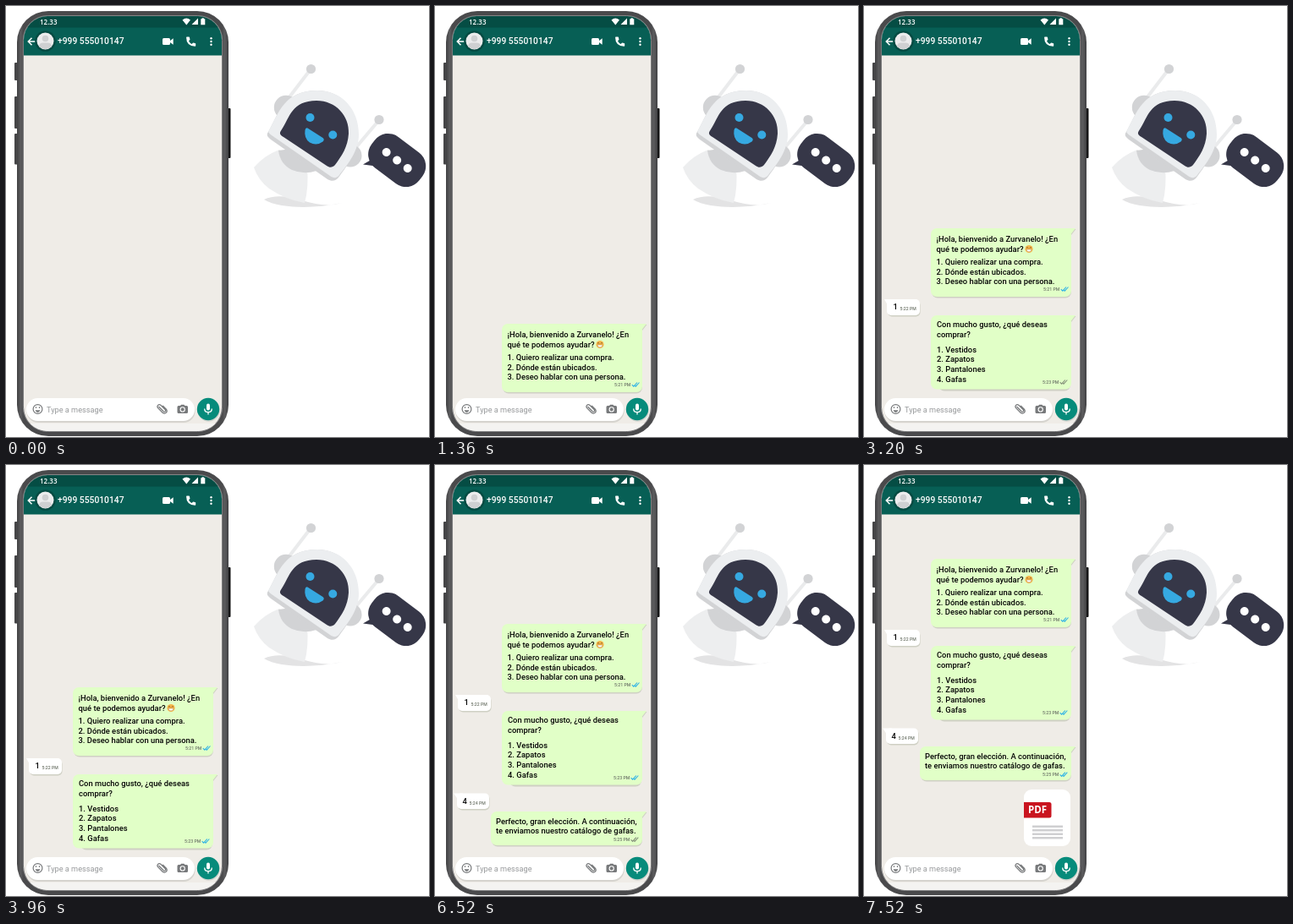
These frames come from a looping animation (500 px wide and 510 px high, 9200 ms). An HTML page:

```html
<!DOCTYPE html>
<html lang="es">
<head>
<meta charset="utf-8">
<title>Chatbot</title>
<style>
  html, body { margin: 0; width: 100%; height: 100%; overflow: hidden; background: #fff; }
  svg { display: block; }
  text { font-family: Roboto, Arial, sans-serif; }

  .chat text { font-size: 9.4px; font-weight: 500; fill: #050505; }
  .chat .time { font-size: 5.2px; fill: #6f766a; }
  .chat .pdf { font: 700 11.5px "Open Sans", sans-serif; fill: #fff; }
  .out { fill: #e1ffc7; }
  .in { fill: #fff; }
  .shade { fill: #cfd0c4; }
  .tick { fill: none; stroke: #85917b; stroke-width: 1.1; }

  /* Every change is a hard cut on one shared loop. */
  .chat, .msg, .tick { animation: 9.2s step-end infinite; }
  .chat { animation-name: scroll; }
  .m1 { animation-name: m1; }
  .m2 { animation-name: m2; }
  .m3 { animation-name: m3; }
  .m4 { animation-name: m4; }
  .m5 { animation-name: m5; }
  .m6 { animation-name: m6; }
  .t1 { animation-name: t1; }
  .t3 { animation-name: t3; }
  .t5 { animation-name: t5; }

  @keyframes scroll {
    0% { transform: translateY(0); }
    20% { transform: translateY(-29px); }
    34.7826% { transform: translateY(-113px); }
    52.1739% { transform: translateY(-142px); }
    70.8695% { transform: translateY(-188px); }
    81.7391%, to { transform: translateY(-265px); }
  }
  @keyframes m1 { 0% { opacity: 0; } 1.7391%, to { opacity: 1; } }
  @keyframes m2 { 0% { opacity: 0; } 20%, to { opacity: 1; } }
  @keyframes m3 { 0% { opacity: 0; } 34.7826%, to { opacity: 1; } }
  @keyframes m4 { 0% { opacity: 0; } 52.1739%, to { opacity: 1; } }
  @keyframes m5 { 0% { opacity: 0; } 70.8695%, to { opacity: 1; } }
  @keyframes m6 { 0% { opacity: 0; } 81.7391%, to { opacity: 1; } }
  @keyframes t1 { 0% { stroke: #85917b; } 14.7826%, to { stroke: #2fb2e6; } }
  @keyframes t3 { 0% { stroke: #85917b; } 43.0434%, to { stroke: #2fb2e6; } }
  @keyframes t5 { 0% { stroke: #85917b; } 78.6956%, to { stroke: #2fb2e6; } }
</style>
</head>
<body>
<svg width="500" height="510" viewBox="0 0 500 510">
  <defs>
    <linearGradient id="metal">
      <stop offset="0" stop-color="#414143"/>
      <stop offset=".018" stop-color="#5c5c5e"/>
      <stop offset=".03" stop-color="#4a4a4c"/>
      <stop offset=".97" stop-color="#4a4a4c"/>
      <stop offset=".982" stop-color="#5c5c5e"/>
      <stop offset="1" stop-color="#414143"/>
    </linearGradient>
    <clipPath id="screen"><rect x="21" y="12" width="234" height="491" rx="28"/></clipPath>
    <path id="check" d="M.3 3.2l2 2L6.5.5M3.9 4.5l.8.7L9 .5"/>
  </defs>

  <!-- Phone body -->
  <g fill="#454547">
    <rect x="10" y="67" width="5" height="21" rx="1"/>
    <rect x="10" y="107" width="5" height="38" rx="1"/>
    <rect x="10" y="151" width="5" height="36.500" rx="1"/>
  </g>
  <rect x="261" y="121" width="4.500" height="59" rx="1" fill="#161617"/>
  <rect x="13" y="6" width="250" height="503" rx="37" fill="url(#metal)"/>
  <rect x="20.300" y="11.500" width="235.400" height="492" rx="29" fill="none" stroke="#858587"/>

  <g clip-path="url(#screen)">
    <rect x="21" y="12" width="234" height="491" fill="#efece7"/>

    <!-- Conversation -->
    <g class="chat">
      <g class="msg m1">
        <rect class="shade" x="80" y="378" width="165" height="80.500" rx="7"/>
        <path class="shade" d="M240 377H250.500L245 384Z"/>
        <rect class="out" x="79" y="376" width="166" height="81" rx="7"/>
        <path class="out" d="M236 376H250L244.500 383Z"/>
        <text x="85.500" y="392">¡Hola, bienvenido a Zurvanelo! ¿En</text>
        <text x="85.500" y="403.500">qué te podemos ayudar?</text>
        <circle cx="195" cy="400.500" r="4.600" fill="#f5b84c"/>
        <path d="M191.800 401H198.200Q197.800 403.900 195 403.900T191.800 401Z" fill="#fff" stroke="#b57832" stroke-width=".5"/>
        <path d="M192 399.300q1.200-1.600 2.300 0M195.700 399.300q1.200-1.600 2.300 0" fill="none" stroke="#7b4b1f" stroke-width=".8"/>
        <text x="85.500" y="419">1. Quiero realizar una compra.</text>
        <text x="85.500" y="430.500">2. Dónde están ubicados.</text>
        <text x="85.500" y="442">3. Deseo hablar con una persona.</text>
        <text class="time" x="212" y="450">5:21 PM</text>
        <use class="tick t1" href="#check" x="232.500" y="445"/>
      </g>

      <g class="msg m2">
        <rect class="shade" x="28" y="462" width="38.500" height="18.500" rx="5"/>
        <rect class="in" x="27" y="460" width="39" height="19" rx="5"/>
        <path class="in" d="M24 460H34L28 467Z"/>
        <text x="34.500" y="472">1</text>
        <text class="time" x="42.500" y="473">5:22 PM</text>
      </g>

      <g class="msg m3">
        <rect class="shade" x="88" y="481" width="156" height="87.500" rx="7"/>
        <path class="shade" d="M240 480H250.500L245 487Z"/>
        <rect class="out" x="79" y="479" width="166" height="87.500" rx="7"/>
        <path class="out" d="M236 479H250L244.500 486Z"/>
        <text x="86" y="493">Con mucho gusto, ¿qué deseas</text>
        <text x="86" y="504.500">comprar?</text>
        <text x="86" y="522.500">1. Vestidos</text>
        <text x="86" y="534">2. Zapatos</text>
        <text x="86" y="546">3. Pantalones</text>
        <text x="86" y="557.500">4. Gafas</text>
        <text class="time" x="211" y="560">5:23 PM</text>
        <use class="tick t3" href="#check" x="231.300" y="555"/>
      </g>

      <g class="msg m4">
        <rect class="shade" x="27" y="578" width="37.500" height="18.500" rx="5"/>
        <rect class="in" x="26" y="576.500" width="38" height="18.500" rx="5"/>
        <path class="in" d="M22 576.500H33L27 583.500Z"/>
        <text x="32.500" y="588.500">4</text>
        <text class="time" x="40.500" y="589.800">5:24 PM</text>
      </g>

      <g class="msg m5">
        <rect class="shade" x="67" y="600" width="178" height="39.500" rx="7"/>
        <path class="shade" d="M240 599H250.500L245 606Z"/>
        <rect class="out" x="66" y="598" width="179" height="40" rx="7"/>
        <path class="out" d="M236 598H250L244.500 605Z"/>
        <text x="72" y="612.500">Perfecto, gran elección. A continuación,</text>
        <text x="72" y="624">te enviamos nuestro catálogo de gafas.</text>
        <text class="time" x="211" y="633">5:25 PM</text>
        <use class="tick t5" href="#check" x="231.300" y="628.200"/>
      </g>

      <g class="msg m6">
        <rect class="in" x="189" y="649" width="55" height="67" rx="9"/>
        <path d="M189 664H219Q221.500 664 221.500 666.500V680Q221.500 682.500 219 682.500H189Z" fill="#c9141f"/>
        <text class="pdf" x="205" y="677.300" text-anchor="middle">PDF</text>
        <path d="M199 692.800H235M199 697.300H235M199 701.800H235M199 706.300H235" stroke="#cfcfd1" stroke-width="2.400"/>
      </g>
    </g>

    <!-- Status bar and header -->
    <rect x="21" y="12" width="234" height="14" fill="#054d44"/>
    <rect x="21" y="25.500" width="234" height="33" fill="#075f55"/>
    <text x="40" y="22" font-size="8" font-weight="600" fill="#fff" style="font-family: 'Open Sans', sans-serif">12.33</text>
    <g fill="#fff">
      <path d="M208.500 16.500Q213.300 12.500 218 16.500L213.300 22.500Z"/>
      <path d="M227 14.500V22H219.500Z"/>
      <path d="M230.300 15.300H231.600V14.300H233.800V15.300H235.300V22.200H230.300Z"/>
      <circle cx="242.500" cy="38.300" r="1.200"/>
      <circle cx="242.500" cy="42" r="1.200"/>
      <circle cx="242.500" cy="45.700" r="1.200"/>
      <rect x="185" y="38" width="9" height="8" rx="1.500"/>
      <path d="M193.500 41.500L197.700 38.300V45.800L193.500 42.700Z"/>
      <path d="M213.800 36.500H216.200Q216.900 36.500 217 37.300Q217.100 38.700 217.500 39.800L216 41.400Q217.300 43.700 219.600 45L221.100 43.500Q222.300 43.900 223.500 44Q224.200 44.100 224.200 44.800V47Q224.200 47.700 223.500 47.700Q213.100 47.200 213.100 37.200Q213.100 36.500 213.800 36.500Z"/>
    </g>
    <path d="M35 42H26.500M30.500 37.800L26.300 42L30.500 46.200" fill="none" stroke="#fff" stroke-width="1.500"/>
    <circle cx="46.500" cy="41.500" r="12.300" fill="#054a42"/>
    <circle cx="46.500" cy="41.500" r="10" fill="#ececed"/>
    <circle cx="46.500" cy="38.500" r="3.800" fill="#cfd0d2"/>
    <path d="M39 48Q39.500 43.600 43.500 43.600H49.500Q53.500 43.600 54 48Q46.500 54.500 39 48Z" fill="#cfd0d2"/>
    <text x="61" y="44.500" font-size="10.300" font-weight="500" fill="#fff">+999 555010147</text>

    <!-- Input row -->
    <rect x="21" y="494" width="234" height="9" fill="#f4f3f1"/>
    <rect x="24.500" y="466" width="199" height="27" rx="13.500" fill="#d5d3ce"/>
    <rect x="24" y="464" width="199" height="27" rx="13.500" fill="#fff"/>
    <circle cx="239.500" cy="478.500" r="13.200" fill="#cfd3ce"/>
    <circle cx="239" cy="477" r="13.200" fill="#068b7b"/>
    <g fill="none" stroke="#77797b" stroke-width="1.200">
      <circle cx="37.500" cy="477" r="5.400"/>
      <path d="M34.600 478.300H40.400Q39.700 481 37.500 481T34.600 478.300Z" fill="#77797b" stroke="none"/>
      <path d="M35.500 474.300v1.700M39.500 474.300v1.700"/>
      <path d="M180.500 474l5.700 5.700q1.400 1 2.200 0t-.3-2.200l-5.200-5.200q-1.900-1.400-3.300 0t0 3.400l5.500 5.500q2.500 1.900 4.300 0t-.2-4.300l-4-4"/>
    </g>
    <path d="M204 473H206L207 471.700H210.500L211.500 473H213.500Q215 473 215 474.500V480.500Q215 482 213.500 482H204Q202.500 482 202.500 480.500V474.500Q202.500 473 204 473Z" fill="#77797b"/>
    <circle cx="208.700" cy="477.400" r="2.600" fill="#77797b" stroke="#fff" stroke-width="1.100"/>
    <text x="48" y="480.500" font-size="9.200" fill="#97999b">Type a message</text>
    <rect x="237" y="470.500" width="4" height="8" rx="2" fill="#fff"/>
    <path d="M234.700 476.500Q234.700 480.700 239 480.700T243.300 476.500M239 480.700V483.500" fill="none" stroke="#fff" stroke-width="1.300"/>
  </g>

  <!-- Robot -->
  <g>
    <path d="M305 229Q322 221 350 230T397 233Q358 241 326 236Q313 234 305 229Z" fill="#e3e3e4"/>
    <path d="M323 170Q305 177 293 191Q298 206 311 216Q330 229 353 233Q358 215 356 190Z" fill="#edeeef"/>
    <path d="M322 171Q324 187 338 194Q352 200 367 195L345 168Z" fill="#d2d3d5"/>
    <g stroke="#eaebec" stroke-width="4">
      <path d="M334 109L360 75M414 167L441 135"/>
    </g>
    <g fill="#d2d3d5">
      <circle cx="360.500" cy="74.500" r="5.600"/>
      <circle cx="441" cy="134.500" r="5.600"/>
      <circle cx="331" cy="120" r="14.200"/>
      <circle cx="407" cy="177" r="13.500"/>
    </g>
    <path d="M310 149C322 128 328 100 368 100C396 100 416 122 416 152C416 172 404 188 393 203C390 207 385 208 380 205L313 158C308 154 308 152 310 149Z" fill="#d2d3d5"/>
    <path d="M311 147C322 128 328 100 368 100C397 100 417 122 417 152C417 171 405 186 394 200C391 204 387 204 383 201L314 153C310 150 310 149 311 147Z" fill="#eceef0"/>
    <path d="M326 146C335 132 338 112 367 112C390 112 406 130 405 151C404 167 397 177 389 188C386 191 383 192 379 189L328 155C323 152 323 150 326 146Z" fill="#363748"/>
    <g fill="#36a9e1">
      <circle cx="359.500" cy="132" r="5"/>
      <circle cx="386.300" cy="152.500" r="5"/>
      <path d="M356.500 144.500L374.500 156Q377 158 374.500 160.500Q367 166 359 161.500Q352 156.500 353.500 147Q354 143.500 356.500 144.500Z"/>
    </g>
  </g>

  <!-- Speech bubble -->
  <path d="M422 187.500L435 180L441 190Z" fill="#363748"/>
  <g transform="translate(462.200 182.500) rotate(37)">
    <rect x="-35.400" y="-22.900" width="70.800" height="45.800" rx="20" fill="#363748"/>
    <g fill="#fff">
      <circle cx="-15.700" r="5"/>
      <circle r="5"/>
      <circle cx="15.700" r="5"/>
    </g>
  </g>
</svg>
</body>
</html>
```
